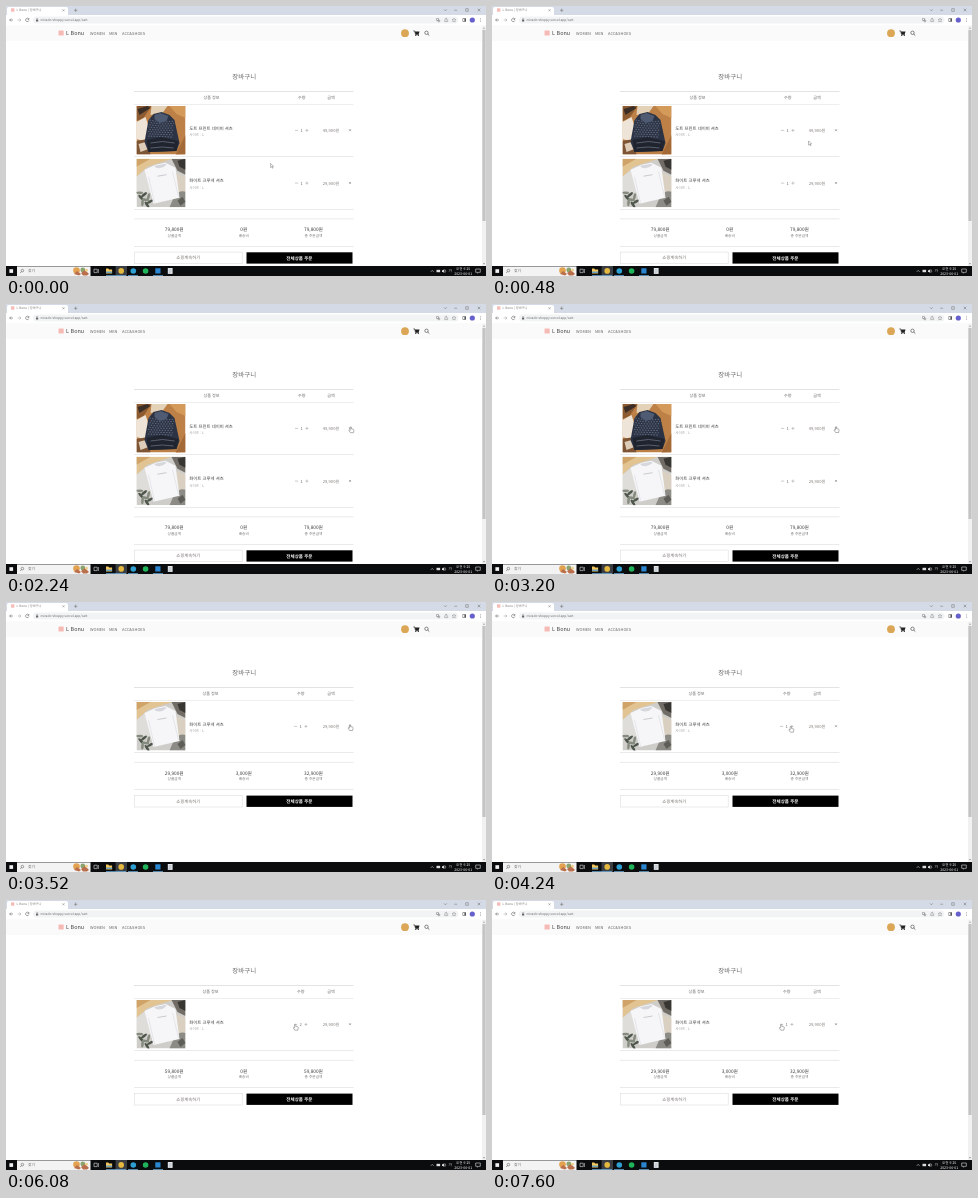
Write an HTML page that moves like this. It is 480 by 270 pixels and loops after 8000 ms.

```html
<!DOCTYPE html>
<html lang="ko">
<head>
<meta charset="utf-8">
<title>장바구니</title>
<style>
  html, body { margin: 0; width: 100%; height: 100%; overflow: hidden; background: #fff; }
  svg { display: block; }
  #stage { width: 480px; height: 270px; }
  text { font-family: "Noto Sans CJK KR", "Noto Sans CJK", "Noto Sans", sans-serif; text-rendering: geometricPrecision; }
</style>
</head>
<body>
<svg id="stage" viewBox="0 0 480 270" xmlns="http://www.w3.org/2000/svg"></svg>
<script>
const LOOP = 8000, STEP = 80, ROW = 52.7;

// y is the vertical middle of the line; glyphs are laid out large and scaled down
function text(x, y, size, str, { fill = '#666', anchor = 'middle', weight = 400, id = '' } = {}) {
  return `<text ${id && `id="${id}"`} transform="translate(${x} ${y + size * 0.36}) scale(.1)" font-size="${size * 10}"
    fill="${fill}" text-anchor="${anchor}" font-weight="${weight}">${str}</text>`;
}
const left = (x, y, size, str, opt) => text(x, y, size, str, { anchor: 'start', ...opt });
const rect = (x, y, w, h, fill, more = '') => `<rect x="${x}" y="${y}" width="${w}" height="${h}" fill="${fill}" ${more}/>`;
const dot = (x, y, r, fill) => `<circle cx="${x}" cy="${y}" r="${r}" fill="${fill}"/>`;
const line = (d, stroke = '#666', width = 0.6) =>
  `<path d="${d}" fill="none" stroke="${stroke}" stroke-width="${width}"/>`;
const shape = (d, fill) => `<path d="${d}" fill="${fill}"/>`;
const rule = (y, color = '#dcdcdc') => rect(128, y, 219.5, 0.6, color);
const cross = (x, y, r, color, w) => line(`M${x - r} ${y - r}l${2 * r} ${2 * r}m0 ${-2 * r}l${-2 * r} ${2 * r}`, color, w);

function browser() {
  return rect(0, 0, 480, 9, '#d5dbe6') +
    shape('M1 9V3q0-2 2-2H60q2 0 2 2V9z', '#fff') +
    rect(5, 2.3, 3.4, 3.4, '#f6bdb8') +
    left(10.5, 4.3, 3.2, 'L Bonu | 장바구니', { fill: '#777' }) +
    cross(57.5, 4.3, 1, '#777', 0.5) +
    line('M68 4.3h3.4M69.7 2.6v3.4', '#666', 0.5) +
    line('M438 3.4l1.4 1.4 1.4-1.4M448.3 4.2h2.8', '#666', 0.5) +
    line('M459.7 2.7h2.6v2.6h-2.6z', '#666', 0.45) +
    cross(473, 4, 1.3, '#666', 0.5) +
    rect(0, 9, 480, 10.6, '#fff') +
    line('M7 14H3.6m1.5-1.5L3.6 14l1.5 1.5') +
    line('M11.6 14h3.4m-1.5-1.5L15 14l-1.5 1.5', '#aaa') +
    line('M22.8 13.2a1.7 1.7 0 1 0 .1 1.3M22.9 12v1.4h-1.4') +
    rect(27, 10.6, 425.5, 7, '#f1f3f4', 'rx="3.5"') +
    rect(30, 13.6, 2.2, 1.9, '#666') + line('M30.5 13.6v-.6a.6.6 0 0 1 1.2 0v.6', '#666', 0.4) +
    left(34.5, 14.1, 3.25, 'mirado-shoppy.vercel.app/cart') +
    line('M430.5 12.5h2v2h-2zM432 14h1.7v1.7h-1.7z', '#777', 0.5) +
    line('M438.7 13.4v2.2h3v-2.2M440.2 14.5v-2.4m-1 .9l1-.9 1 .9', '#777', 0.45) +
    line('M448 12.1l.6 1.3 1.4.1-1.1 1 .4 1.4-1.3-.8-1.3.8.4-1.4-1.1-1 1.4-.1z', '#777', 0.4) +
    rect(456.6, 12.3, 3.4, 3.4, '#555') + rect(457.1, 12.8, 1.3, 2.4, '#fff') +
    dot(466.3, 14, 2.6, '#6660cc') +
    [12.6, 14, 15.4].map(y => dot(474.5, y, 0.4, '#555')).join('');
}

function header() {
  return rect(0, 19.6, 476, 15.4, '#fafafa') + rect(0, 19.4, 480, 0.4, '#e6e8ea') +
    rect(52.5, 24.4, 5.2, 5.2, '#f6bab5', 'rx=".6"') +
    left(60, 27, 5.5, 'L Bonu', { fill: '#444', weight: 500 }) +
    left(84, 27.2, 4, 'WOMEN') + left(103, 27.2, 4, 'MEN') + left(116, 27.2, 4, 'ACC&amp;SHOES') +
    dot(399, 27.2, 3.9, '#dba756') +
    line('M407.4 24.9h1.2l1 3.6h3.2', '#222', 0.7) +
    shape('M408.9 25.5h4.6l-.8 2.7h-3.2z', '#222') + dot(409.8, 29.4, 0.6, '#222') + dot(412.3, 29.4, 0.6, '#222') +
    '<circle cx="420.5" cy="26.8" r="1.7" fill="none" stroke="#555" stroke-width=".7"/>' +
    line('M421.7 28l1.6 1.6', '#555', 0.8);
}

const photo = body => `<svg x="130.5" y="100" width="49" height="48.5" viewBox="0 0 49 48.5">${body}</svg>`;

function navyPhoto() {
  let print = '';
  for (let i = 0; i < 8; i++) {
    const y = 14 + i * 2.3;
    print += `<path d="M${13 - i * 0.3} ${y}q12 ${3 - i * 0.4} 25 1" fill="none" stroke="#8b95a8"
      stroke-width=".7" stroke-dasharray="1.3 1.5" stroke-dashoffset="${i * 1.1}"/>`;
  }
  return photo(rect(0, 0, 49, 48.5, '#bd8147') +
    shape('M0 0H15L7 12 0 15z', '#8d5b31') + shape('M1 3L11 0 14 2 3 9z', '#3a2e27') +
    shape('M15 0H31L26 7 14 9z', '#e4d2b8') +
    shape('M33 0H49V12L40 8z', '#d39a5a') +
    shape('M0 16L9 11 12 20 10 36 0 33z', '#eee5d8') +
    shape('M0 35L11 33 14 48.5H0z', '#7d5434') + shape('M2 38l7-2 3 7-8 3z', '#ddcdb8') +
    shape('M39 49L49 29V48.5z', '#a36a38') +
    shape('M12 14L17 8 25 6 33 9 38 14 43 37 40 45 12 46 8 36z', '#2b3345') + print +
    shape('M18 9l6-2 8 3-2 5-7 2-5-4z', '#4e5b72') +
    shape('M10 34l15-3 17 4-2 10-28 1z', '#20242f') +
    line('M14 37q12-3 24 0M14 42q12-2 23 0', '#707887', 0.7));
}

function whitePhoto() {
  let leaves = '';
  for (let i = 0; i < 8; i++) {
    const x = 3 + i * 1.5, y = 34 + (i * 5) % 13;
    leaves += `<ellipse cx="${x}" cy="${y}" rx="3.6" ry="1.3" fill="${i % 2 ? '#4f574c' : '#858b7e'}"
      transform="rotate(${i * 47} ${x} ${y})"/>`;
  }
  return photo(rect(0, 0, 49, 48.5, '#cfcdc9') +
    shape('M0 0H36L11 8 0 18z', '#e2c493') + shape('M0 0H14L0 8z', '#d0a469') +
    shape('M0 18L10 10 15 34 0 34z', '#dfddd9') +
    shape('M35 0H49V16L41 12z', '#716c66') + shape('M41 2l8-2v11l-6-3z', '#383633') +
    shape('M39 14l10 4v16l-7 1z', '#d9d0c2') + leaves +
    shape('M38 37q5-6 11-4V48.5H33z', '#8c8b85') + shape('M41 42l5-4 3 5-5 4z', '#5e5e59') +
    shape('M8 11L19 6 29 4 39 9 43 39 17 45 12 26z', '#f6f6f8') +
    shape('M18 8q6 4 12-2l-1-1-11 2z', '#d6d7dc') +
    line('M12 18l6 26M36 13l6 25', '#dddee3', 0.7) +
    line('M21 17.5l9-1.5', '#a9acb4', 0.6));
}

function item(pic, name, price, qtyId) {
  return pic + left(183.2, 122, 4.35, name, { fill: '#3a3a3a' }) +
    left(183.2, 128.7, 3.6, '사이즈 : L', { fill: '#999' }) +
    `<g class="qty">${line('M289 124.4h3.2M299.4 124.4h3M300.9 122.9v3', '#999', 0.5)}
      ${text(295.7, 124.4, 4.2, '1', { fill: '#777', id: qtyId })}</g>` +
    text(325, 124.4, 4.15, price, { fill: '#857f7b' }) +
    cross(344, 124.2, 0.9, '#777', 0.6) +
    rule(150.3);
}

function footer() {
  const sum = (x, id, label) => text(x, 170.9, 4.75, '', { fill: '#3a3a3a', weight: 500, id }) +
    text(x, 177.1, 3.7, label, { fill: '#777' });
  return rule(159.9) + sum(168.3, 'goods', '상품금액') + sum(237.8, 'fee', '배송비') +
    sum(307.5, 'total', '총 주문금액') + rule(187.4) +
    rect(128.6, 193.4, 107.6, 11.6, '#fff', 'stroke="#dedede" stroke-width=".6"') +
    text(182.3, 199.2, 4.35, '쇼핑계속하기', { fill: '#77726f' }) +
    rect(240.5, 193.6, 106, 11.3, '#000') +
    text(293.4, 199.2, 4.5, '전체상품 주문', { fill: '#fff', weight: 700 });
}

function taskbar() {
  const white = { fill: '#eee' };
  return rect(0, 260, 480, 10, '#0b0c0e') +
    rect(3.4, 263.2, 3.7, 3.7, '#f2f2f2') +
    rect(11, 260.4, 73.5, 9.6, '#f3f3f3') +
    '<circle cx="16.4" cy="264.6" r="1.3" fill="none" stroke="#444" stroke-width=".5"/>' +
    line('M15.5 265.6l-1.3 1.4', '#444', 0.5) +
    left(22, 265, 3.8, '찾기') +
    dot(70.5, 264.5, 3.3, '#e3a24f') + dot(76.8, 264, 2.4, '#8aa36f') +
    shape('M68 268l3-3 4 3-2 1.6zM75 267l4-3 4 4-2 1.6h-4z', '#ba6f4c') + dot(80.5, 264.2, 1.4, '#f0cf8a') +
    line('M88 263.2h3.2v3.4H88zM92.4 263v4', '#ddd', 0.6) +
    shape('M100 262.6h2.3l.8.8h3v4.2h-6.1z', '#f3c55a') + rect(100, 265.6, 6.1, 1.2, '#4d9bd8') +
    rect(109.6, 260, 11.4, 10, '#3b3e42') + dot(115.2, 264.9, 2.8, '#e5b83f') +
    dot(127.3, 265, 2.8, '#2e9fd3') + dot(139.6, 265, 2.8, '#1fb459') +
    rect(149.3, 262.3, 5.2, 5.2, '#2b86d1') +
    rect(161.8, 262, 4.8, 5.9, '#e4e6e8') + line('M162.7 263.8h3M162.7 265.2h3M162.7 266.6h2', '#7890a8', 0.4) +
    [100, 110, 122, 147].map(x => rect(x, 269.3, 10, 0.7, '#76b9ed')).join('') +
    line('M424.8 265.8l1.4-1.4 1.4 1.4', '#ddd', 0.6) +
    rect(430.5, 263.8, 3.6, 2.4, '#ddd') +
    shape('M436 264.3h1l1.3-1.2v4l-1.3-1.2h-1z', '#ddd') + line('M439.3 263.7q1 1.4 0 2.8', '#ddd', 0.5) +
    text(444.3, 265, 3.7, '가', white) +
    text(457.2, 262.7, 3.5, '오전 9:25', { fill: '#fff', weight: 500 }) +
    text(457.2, 267.3, 3.5, '2023-06-01', { fill: '#fff', weight: 500 }) +
    line('M469.7 263h4.6v3.3h-1.7l-1 1v-1h-1.9z', '#ddd', 0.6);
}

const stage = document.getElementById('stage');
stage.innerHTML = rect(0, 0, 480, 270, '#fff') + header() +
  text(238.2, 71, 6.5, '장바구니') +
  rule(85.2, '#d0d0d0') + rule(98.1, '#e2e2e2') +
  `<g class="qty">${text(205.5, 91.8, 4.1, '상품 정보')}${text(295.7, 91.8, 4.1, '수량')}</g>` +
  text(325, 91.8, 4.1, '금액') +
  `<g id="first">${item(navyPhoto(), '도트 프린트 네이비 셔츠', '49,900원', 'qtyA')}</g>
   <g id="second">${item(whitePhoto(), '화이트 크루넥 셔츠', '29,900원', 'qtyB')}</g>
   <g id="footer">${footer()}</g>` +
  rect(476, 19.6, 4, 240.4, '#f1f1f1') +
  shape('M477 22.6l1-1.2 1 1.2zM477 257.2l1 1.2 1-1.2z', '#777') +
  rect(476.4, 24, 3.2, 191, '#c4c4c4') +
  browser() + taskbar() +
  `<path id="arrow" d="M0 0V4.2L1 3.3 1.7 4.8 2.4 4.5 1.7 3H3z" fill="#fff" stroke="#555" stroke-width=".4"/>
   <path id="hand" d="M-.6 .4Q0-.4 .6 .4V2.2L2.6 2.6Q3.2 2.8 3.1 3.6L2.6 6H-.4L-2 3.6Q-1.8 2.8-.6 3.6z"
     fill="#fff" stroke="#555" stroke-width=".45" stroke-linejoin="round"/>`;

const $ = id => document.getElementById(id);
const won = n => n.toLocaleString('en-US') + '원';

// time, x, y of the pointer tip
const path = [
  [0, 264.6, 157.4], [800, 344.8, 122.7], [2400, 344.8, 122.7], [2720, 344.6, 123.4],
  [2880, 344.6, 123.4], [3200, 344, 122.5], [3680, 344, 122.5], [4240, 298.8, 124.2],
  [5360, 298.8, 124.2], [5760, 289.2, 124.2], [LOOP, 289.2, 124.2]
];
function pointer(t) {
  const i = path.findIndex((p, k) => k && t <= p[0]);
  const [t0, x0, y0] = path[i - 1], [t1, x1, y1] = path[i];
  const u = (t - t0) / (t1 - t0), e = u * u * (3 - 2 * u);
  return [x0 + (x1 - x0) * e, y0 + (y1 - y0) * e];
}
const move = (el, x, y) => el.setAttribute('transform', `translate(${x} ${y})`);

function draw(time) {
  const t = Math.floor((time % LOOP) / STEP) * STEP;
  const both = t < 3520;
  const count = t >= 4960 && t < 6480 ? 2 : 1;
  const goods = both ? 79800 : 29900 * count;
  const fee = goods < 50000 ? 3000 : 0;
  const drop = both ? ROW : 0;

  $('first').style.display = both ? '' : 'none';
  move($('second'), 0, drop);
  move($('footer'), 0, drop);
  document.querySelectorAll('.qty').forEach(g => move(g, both ? 0 : -1, 0));
  $('qtyB').textContent = count;
  $('goods').textContent = won(goods);
  $('fee').textContent = won(fee);
  $('total').textContent = won(goods + fee);

  const [x, y] = pointer(t);
  const over = y < 127 && [289.5, 299.5, 344.2].some(b => Math.abs(x - b) < 2.2);
  move($('arrow'), x, y);
  move($('hand'), x, y);
  $('arrow').style.display = over ? 'none' : '';
  $('hand').style.display = over ? '' : 'none';
}

const start = performance.now();
function tick() {
  draw(performance.now() - start);
  requestAnimationFrame(tick);
}
tick();
</script>
</body>
</html>
```
